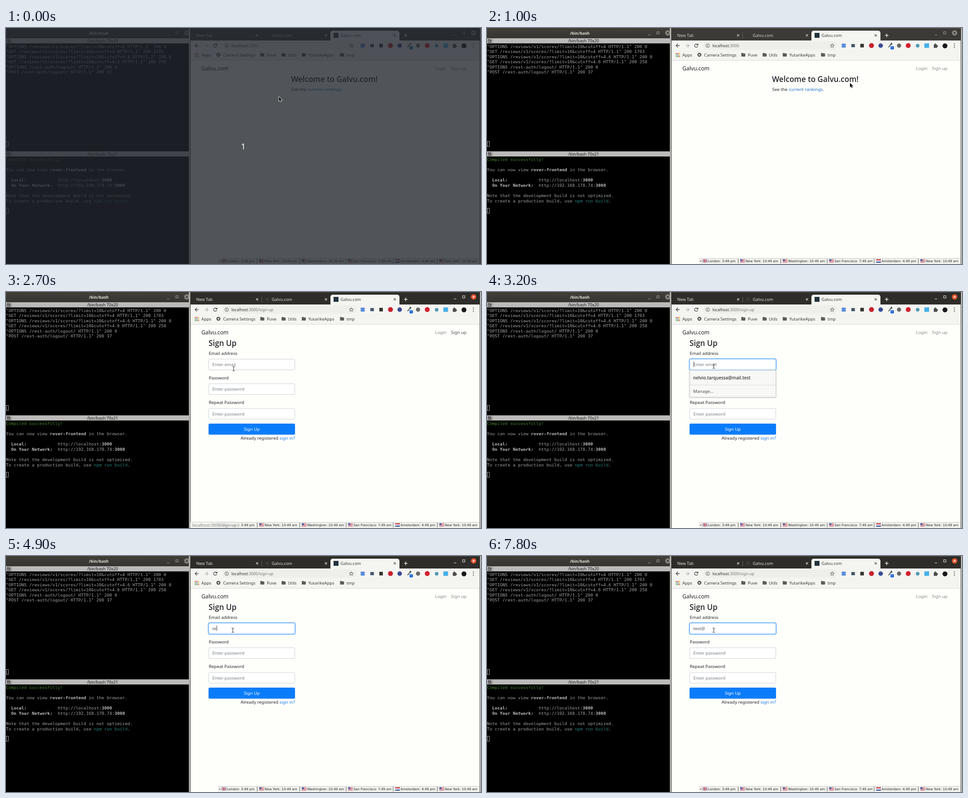
Animation of 1060 by 529 pixels, one loop 8 s. Source, as an HTML page with a canvas:

```html
<!DOCTYPE html>
<html lang="en">
<head>
<meta charset="utf-8">
<title>Sign-up demo</title>
<style>
  html, body { margin: 0; width: 100%; height: 100%; overflow: hidden; background: #000; }
  canvas { display: block; width: 1060px; height: 529px; }
</style>
</head>
<body>
<canvas id="stage" width="1060" height="529"></canvas>
<script>
const ctx = document.getElementById('stage').getContext('2d');
const LOOP = 8000;
const UI = '"Noto Sans", "Open Sans", sans-serif';
const SEMI = '"Open Sans", "Noto Sans", sans-serif';
const MONO = '"DejaVu Sans Mono", monospace';
const CLOCK = '"DejaVu Sans", sans-serif';
const SITE = 'Galvu.com';
const BODY = 9.8;

// ---------- helpers ----------
function rect(x, y, w, h, color) {
  ctx.fillStyle = color;
  ctx.fillRect(x, y, w, h);
}
function round(x, y, w, h, r, fill, stroke) {
  ctx.beginPath();
  ctx.roundRect(x, y, w, h, r);
  if (fill) { ctx.fillStyle = fill; ctx.fill(); }
  if (stroke) { ctx.strokeStyle = stroke; ctx.lineWidth = 1; ctx.stroke(); }
}
function disc(x, y, r, color) {
  ctx.fillStyle = color;
  ctx.beginPath();
  ctx.arc(x, y, r, 0, 7);
  ctx.fill();
}
function ring(x, y, r, color, width = 1, from = 0, to = 7) {
  ctx.strokeStyle = color;
  ctx.lineWidth = width;
  ctx.beginPath();
  ctx.arc(x, y, r, from, to);
  ctx.stroke();
}
function line(color, width, ...points) {
  ctx.strokeStyle = color;
  ctx.lineWidth = width;
  ctx.beginPath();
  for (let i = 0; i < points.length; i += 2) ctx.lineTo(points[i], points[i + 1]);
  ctx.stroke();
}
function text(str, x, y, size, color, opt = {}) {
  ctx.font = `${opt.weight || 400} ${size}px ${opt.font || UI}`;
  ctx.textAlign = opt.align || 'left';
  ctx.fillStyle = color;
  ctx.fillText(str, x, y);
  return ctx.measureText(str).width;
}
function cross(x, y, r, color, width = 1.2) {
  line(color, width, x - r, y - r, x + r, y + r);
  line(color, width, x + r, y - r, x - r, y + r);
}
function windowButtons(x, color, closeFill, closeMark) {
  line(color, 1, x - 44, 15.5, x - 39, 15.5);
  ctx.strokeStyle = color;
  ctx.strokeRect(x - 24.5, 8.5, 5, 5);
  disc(x, 11, 6, closeFill);
  cross(x, 11, 2, closeMark, 1.1);
}

// ---------- terminals ----------
const LOG = [
  '"OPTIONS /reviews/v1/scores/?limit=10&cutoff=4 HTTP/1.1" 200 0',
  '"GET /reviews/v1/scores/?limit=10&cutoff=4 HTTP/1.1" 200 1703',
  '"OPTIONS /reviews/v1/scores/?limit=10&cutoff=4.6 HTTP/1.1" 200 0',
  '"GET /reviews/v1/scores/?limit=10&cutoff=4.6 HTTP/1.1" 200 258',
  '"OPTIONS /rest-auth/logout/ HTTP/1.1" 200 0',
  '"POST /rest-auth/logout/ HTTP/1.1" 200 37'
];
const GREY = '#a3a3a3', BOLD = '#bdbdbd';
// Runs: row, column, string, style
const BUILD = [
  [0, 0, 'Compiled successfully!', '#43852a'],
  [2, 0, 'You can now view '], [2, 17, 'rover-frontend', BOLD], [2, 32, 'in the browser.'],
  [4, 2, 'Local:', BOLD], [4, 20, 'http://localhost:'], [4, 37, '3000', BOLD],
  [5, 2, 'On Your Network:', BOLD], [5, 20, 'http://192.168.178.74:'], [5, 42, '3000', BOLD],
  [7, 0, 'Note that the development build is not optimized.'],
  [8, 0, 'To create a production build, use '], [8, 34, 'npm run build', '#2b8080'], [8, 47, '.']
];
const COL = 5.77, ROW = 11.55;

function mono(str, col, y, color = GREY) {
  text(str, col * COL, y, 9.58, color, { font: MONO, weight: color === BOLD ? 700 : 400 });
}
function paneBar(y, label) {
  rect(0, y, 408, 11.5, '#bbbab8');
  ctx.strokeStyle = '#222';
  ctx.lineWidth = 1;
  ctx.strokeRect(2.5, y + 2.5, 4, 3);
  ctx.strokeRect(2.5, y + 5.5, 4, 4);
  ctx.strokeRect(6.5, y + 5.5, 3, 4);
  line('#222', 1, 8.5, y + 1.5, 8.5, y + 5);
  line('#8d8c8a', 1, 12.5, y, 12.5, y + 11.5);
  text(label, 215.5, y + 9, 9.1, '#1c1c1c', { align: 'center' });
}
function promptBox(y) {
  ctx.strokeStyle = '#a0a0a0';
  ctx.lineWidth = 1;
  ctx.strokeRect(0.5, y + 0.5, 5, 11);
}
function terminals() {
  rect(0, 0, 408, 529, '#000');
  const shade = ctx.createLinearGradient(0, 0, 0, 23);
  shade.addColorStop(0, '#403f3a');
  shade.addColorStop(1, '#353430');
  rect(0, 0, 409, 23, shade);
  text('/bin/bash', 207, 15, 9.15, '#e4e1da', { weight: 700, align: 'center' });
  windowButtons(403.5, '#a9a7a1', '#85837c', '#33322e');
  paneBar(23, '/bin/bash 70x20');
  LOG.forEach((s, i) => mono(s, 0, 44.5 + i * ROW));
  promptBox(254);
  paneBar(276.5, '/bin/bash 70x21');
  for (const [row, col, s, color] of BUILD) mono(s, col, 298.2 + row * ROW, color);
  promptBox(403.5);
}

// ---------- browser ----------
function folder(x) {
  round(x - 4.5, 56, 4.5, 3, 1, '#5c5c5a');
  round(x - 4.5, 57, 9, 7, 1, '#5c5c5a');
}
function tabStrip(active) {
  rect(412, 0, 645, 29, active ? '#2e2d29' : '#3b3a36');
  line(active ? '#4a4944' : '#55544e', 1, 412, 0.5, 1057, 0.5);
  const ink = active ? '#e2e0db' : '#d0cec8';
  text('New Tab', 424.5, 20, 9.2, ink);
  text(SITE, 593, 20, 9.2, ink);
  if (active) disc(583, 16.5, 4.5, '#3a3935');
  cross(560.5, 16.5, 2.3, ink);
  cross(714, 16.5, 2.3, ink);
  line('#6a6963', 1, 570.5, 11, 570.5, 23);
  round(724, 6, 154, 30, 5, '#f4f4f0');
  rect(731, 11, 11, 11, '#22323c');
  text(SITE, 746.5, 20, 9.2, '#3c3c3c');
  cross(867.5, 16.5, 2.3, '#4a4a4a');
  line('#f0eee9', 1.4, 888, 16.5, 896, 16.5);
  line('#f0eee9', 1.4, 892, 12.5, 892, 20.5);
  if (active) windowButtons(1043.5, '#f2f0ea', '#e8552f', '#fff');
  else windowButtons(1043.5, '#a5a39d', '#85837c', '#33322e');
}
function arrow(x, dir, color) {
  line(color, 1.4, x - 4, 39.5, x + 4, 39.5);
  line(color, 1.4, x - dir * -0.2, 35.5, x + dir * 4, 39.5, x, 43.5);
}
function toolbar(url) {
  rect(412, 28, 645, 44, '#f4f4f0');
  line('#d9d9d5', 1, 412, 72.5, 1057, 72.5);
  arrow(426, -1, '#4a4a4a');
  arrow(447, 1, '#b9b9b6');
  ring(467, 39.5, 3.7, '#4a4a4a', 1.4, 0.4, 5.5);
  ctx.fillStyle = '#4a4a4a';
  ctx.beginPath();
  ctx.moveTo(471.5, 34.5); ctx.lineTo(471.5, 39); ctx.lineTo(467, 39);
  ctx.fill();
  round(482, 30, 300, 18.5, 9, '#eeeeea');
  ring(492.5, 39.5, 4, '#555', 1);
  rect(492, 38.6, 1, 3.4, '#555');
  rect(492, 36.8, 1, 1, '#555');
  const host = text('localhost', 503, 42.5, 8.75, '#2c2c2c');
  text(url, 503 + host, 42.5, 8.75, '#777775');
  star(770.5, 39.7);

  rect(791.5, 35, 9, 9, '#5b8fdc');
  rect(813, 36, 8, 7, '#44576a');
  rect(833, 35.5, 8, 8, '#333');
  disc(858, 39.3, 5.5, '#c8202c');
  disc(878.5, 39.5, 5, '#3a4a94');
  line('#526070', 2, 896, 43, 902, 36);
  disc(902.5, 35.5, 2, '#3c4650');
  round(900.5, 41, 7.5, 7, 1, '#1a67d2');
  rect(903, 44, 2, 1, '#fff');
  disc(919.5, 39.5, 4.7, '#686866');
  disc(940, 39.3, 5.5, '#d3202e');
  disc(961, 39.7, 4, '#4a9ab4');
  rect(976, 34.5, 10.5, 10, '#45b0e8');
  round(997, 37, 7.5, 7.5, 1, '#4c4c4c');
  disc(1000.5, 36.5, 1.8, '#4c4c4c');
  disc(1004.7, 40.8, 1.8, '#4c4c4c');
  disc(1022, 40, 5.5, '#17191c');
  for (const y of [35.5, 39.5, 43.5]) disc(1043, y, 1.1, '#4a4a4a');

  const dots = ['#d8432f', '#d8432f', '#e3a72c', '#3c9c55', '#3f76d0', '#e3a72c', '#3c9c55', '#3c9c55', '#d8432f'];
  dots.forEach((c, i) => rect(421.5 + (i % 3) * 3.4, 56 + Math.floor(i / 3) * 3.4, 2.2, 2.2, c));
  ring(474, 60, 2.8, '#4a4a4a', 1.9);
  for (let a = 0; a < 8; a++) disc(474 + 4 * Math.cos(a * Math.PI / 4), 60 + 4 * Math.sin(a * Math.PI / 4), 0.9, '#4a4a4a');
  [572, 619.5, 664.5, 750].forEach(folder);
  const marks = [['Apps', 436], ['Camera Settings', 484.5], ['Puve', 582], ['Utils', 629], ['YutarikeApps', 674.5], ['tmp', 760]];
  for (const [s, x] of marks) text(s, x, 63.5, 9.4, '#3a3a3a');
}
function star(x, y) {
  ctx.beginPath();
  for (let i = 0; i < 10; i++) {
    const a = -Math.PI / 2 + i * Math.PI / 5, r = i % 2 ? 2 : 4.7;
    ctx.lineTo(x + r * Math.cos(a), y + r * Math.sin(a));
  }
  ctx.closePath();
  ctx.strokeStyle = '#555';
  ctx.lineWidth = 1;
  ctx.stroke();
}

// ---------- clock bar ----------
const CITIES = [
  ['London: 3:49 pm', 493, 'uk'], ['New York: 10:49 am', 577, 'us'], ['Washington: 10:49 am', 672, 'us'],
  ['San Francisco: 7:49 am', 775.5, 'us'], ['Amsterdam: 4:49 pm', 880.5, 'nl'], ['New York: 10:49 am', 979, 'us']
];
function flag(x, kind) {
  const y = 518.5;
  if (kind === 'nl') {
    rect(x, y, 10.5, 7.5, '#fff');
    rect(x, y, 10.5, 2.5, '#c8303c');
    rect(x, y + 5, 10.5, 2.5, '#2b4a94');
  } else if (kind === 'us') {
    rect(x, y, 10.5, 7.5, '#f4e6e6');
    for (let i = 0; i < 4; i++) rect(x, y + i * 2.1, 10.5, 1.1, '#d2606a');
    rect(x, y, 5, 4, '#4a62a8');
  } else {
    rect(x, y, 10.5, 7.5, '#35508f');
    line('#e8e8f0', 1.4, x, y, x + 10.5, y + 7.5);
    line('#e8e8f0', 1.4, x + 10.5, y, x, y + 7.5);
    rect(x + 3.8, y, 3, 7.5, '#fff');
    rect(x, y + 2.4, 10.5, 2.8, '#fff');
    rect(x + 4.5, y, 1.6, 7.5, '#cc3340');
    rect(x, y + 3, 10.5, 1.5, '#cc3340');
  }
}
function clockBar() {
  rect(473, 516, 584, 13, '#f1f1ed');
  line('#c6c6c2', 1, 473, 516.5, 1057, 516.5);
  cross(477, 522.5, 1.5, '#444', 0.9);
  CITIES.forEach(([s, x, kind], i) => {
    if (i) line('#555', 1, x - 16.5, 517.5, x - 16.5, 527.5);
    flag(x - 12, kind);
    text(s, x, 525, 7.27, '#222', { font: CLOCK });
  });
}
function statusBubble() {
  round(411, 515.5, 107, 16, [0, 3, 0, 0], 'rgba(240,240,236,.82)', 'rgba(190,190,186,.7)');
  text('localhost:3000/sign-up', 415.5, 525.8, 9.3, '#858583');
}

// ---------- pages ----------
function navbar(hover) {
  text(SITE, 436, 95, 12.2, '#1f1f1f');
  text('Login', 957.5, 94.3, BODY, '#868684');
  text('Sign up', 993, 94.3, BODY, hover ? '#4c4c4b' : '#868684');
}
function heading(s, x) {
  text(s, x, 120.8, 17.1, '#24282c', { weight: 600, font: SEMI });
}
function welcome() {
  heading('Welcome to ' + SITE + '!', 636);
  const w = text('See the ', 636.5, 141, BODY, '#24282c');
  text('current rankings.', 636.5 + w, 141, BODY, '#1d6cc8');
}
function field(label, y, placeholder) {
  text(label, 452.5, y - 9.3, BODY, '#24282c');
  round(452.5, y + 0.5, 192, 24, 2.5, '#fff', '#cbd0d5');
  if (placeholder) text(placeholder, 460.5, y + 16, BODY, '#757c83');
}
function focusRing(amount) {
  ctx.globalAlpha = amount;
  round(451.2, 149.2, 194.6, 26.6, 4, null, 'rgba(0,123,255,.27)');
  ctx.lineWidth = 2.4;
  ctx.stroke();
  round(452.5, 150.5, 192, 24, 2.5, null, '#80b9f8');
  ctx.globalAlpha = 1;
}
function suggestions(alpha) {
  ctx.globalAlpha = alpha;
  ctx.shadowColor = 'rgba(0,0,0,.3)';
  ctx.shadowBlur = 3;
  ctx.shadowOffsetY = 1;
  round(452, 176, 193, 59.5, 1.5, '#f8f8f7');
  ctx.shadowColor = 'transparent';
  ctx.shadowOffsetY = ctx.shadowBlur = 0;
  round(452.5, 175.5, 192, 60, 1.5, null, '#d2d2d0');
  line('#d8d8d6', 1, 453, 208.5, 644, 208.5);
  text('nelvio.tarquessa@mail.test', 460, 195.5, BODY, '#3a3a3a', { weight: 600, font: SEMI });
  text('Manage…', 460, 226, BODY, '#4c4c4c');
  ctx.globalAlpha = 1;
}
const KEYS = [[4700, 't'], [4900, 'e'], [5000, 's'], [5100, 't'], [5900, '@']];
const BLINKS = [[3000, 3500], [4100, 5600], [5900, 6600], [7100, 7800]];

function signUp(t) {
  const typed = KEYS.filter(k => t >= k[0]).map(k => k[1]).join('');
  heading('Sign Up', 452);
  field('Email address', 150, typed ? '' : 'Enter email');
  field('Password', 205.2, 'Enter password');
  field('Repeat Password', 260.6, 'Enter password');
  round(452, 295, 193, 24.7, 2.5, '#0b7cf9');
  text('Sign Up', 548.5, 311, BODY, '#fff', { align: 'center' });
  const w = text('sign in?', 645, 331.3, BODY, '#127ce8', { align: 'right' });
  text('Already registered ', 645 - w, 331.3, BODY, '#24282c', { align: 'right' });

  if (t >= 2900) focusRing(t < 3000 ? 0.4 : t < 3200 ? 0.8 : 1);
  const end = typed ? text(typed, 460.5, 166, BODY, '#495057') + 0.5 : 0;
  if (BLINKS.some(([a, b]) => t >= a && t < b)) rect(Math.round(460.5 + end), 156, 1, 12, '#444');
  if (t >= 2900 && t < 4900) suggestions(t < 3000 || t >= 4700 ? 0.5 : 1);
}

// ---------- pointer ----------
const ARROW = new Path2D('M0 0V10.2L2.4 8L4.1 11.7L5.8 10.9L4.1 7.3H7.4Z');
const HAND = new Path2D('M-1 0.3Q0 -0.9 1 0.3V4L6 5Q7 5.4 6.8 6.6L6 10.5H0L-3.4 6.5Q-3 5 -1 6.2Z');

function shape(path, x, y, fill, stroke) {
  ctx.save();
  ctx.translate(x, y);
  ctx.lineJoin = 'round';
  ctx.lineWidth = 1.3;
  ctx.strokeStyle = stroke;
  ctx.stroke(path);
  ctx.fillStyle = fill;
  ctx.fill(path);
  ctx.restore();
}
function beam(x, y) {
  line('#222', 1, x, y - 4.5, x, y + 4.5);
  for (const s of [-1, 1]) line('#222', 1, x - 2.5, y + s * 5, x - 0.5, y + s * 4.5, x + 0.5, y + s * 4.5, x + 2.5, y + s * 5);
}
const mix = (a, b, k) => a + (b - a) * k;

function pointer(t) {
  const step = Math.floor(t / 100);
  if (step < 14) {
    const k = Math.max(0, (step - 6) / 8), e = k * k * (3 - 2 * k);
    shape(ARROW, mix(609, 1011, e), mix(154, 92, e), '#1a1a1a', '#fff');
  } else if (step < 23) {
    shape(HAND, 1012, 92.5, '#fff', '#222');
  } else if (step < 25) {
    const k = (step - 22) / 3;
    shape(ARROW, mix(1012, 518, k), mix(93, 172, k), '#1a1a1a', '#fff');
  } else if (step < 27) beam(518, 175);
  else if (step < 28) beam(508, 172);
  else if (step < 29) beam(506, 169);
  else beam(506, 166.5);
}

// ---------- frame ----------
function draw(t) {
  const onForm = t >= 1900;
  rect(0, 0, 1060, 529, '#c9c8c4');
  terminals();
  rect(408, 0, 4, 529, '#b4b3af');
  rect(411, 0, 1, 529, '#4a4945');
  rect(412, 72, 645, 457, '#fefefb');
  tabStrip(onForm);
  toolbar(onForm ? ':3000/sign-up' : ':3000');
  rect(1057, 0, 1, 529, '#4a4945');
  navbar(t >= 1400 && t < 3000);
  if (onForm) signUp(t); else welcome();
  clockBar();
  if (t >= 1700 && t < 3000) statusBubble();
  if (t < 100) {
    rect(0, 0, 1060, 529, 'rgba(35,39,46,.79)');
    text('1', 529.5, 271.5, 18.5, '#fff', { align: 'center' });
  }
  pointer(t);
}
const start = performance.now();
function tick() {
  draw((performance.now() - start) % LOOP);
  requestAnimationFrame(tick);
}
tick();
</script>
</body>
</html>
```
